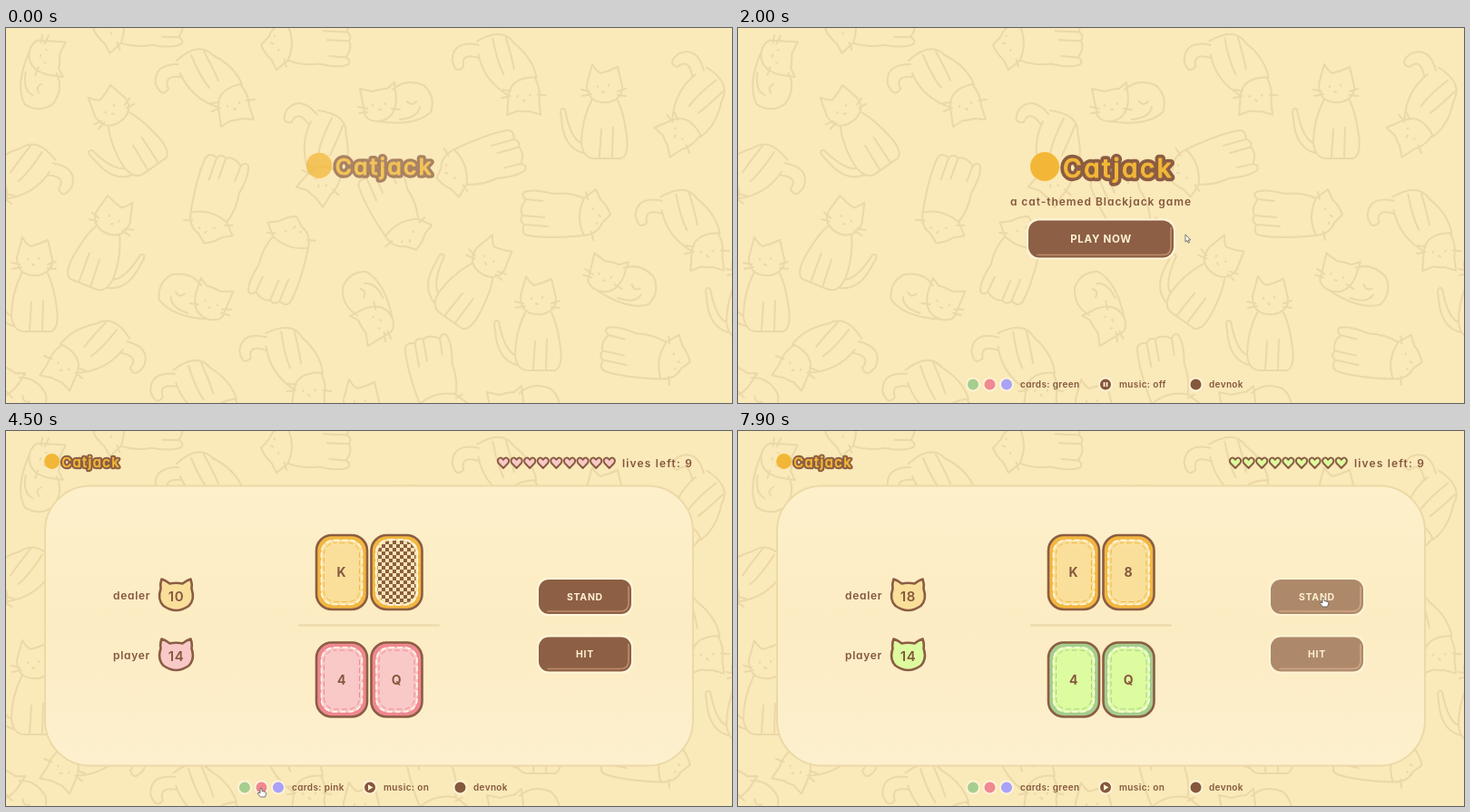
Recreate the animation shown at these times as an HTML page. Size 800x414 px, loop 8 s.

```html
<!DOCTYPE html>
<html lang="en">
<head>
<meta charset="utf-8">
<title>Catjack</title>
<style>
  html, body { margin: 0; width: 100%; height: 100%; overflow: hidden; background: #fae9b9; }
  svg { display: block; width: 100vw; height: 100vh; }
  text { font: 600 12px Inter, Lato, sans-serif; font-feature-settings: "cv11"; letter-spacing: .7px; fill: #85573d; }
  .mid { text-anchor: middle; }
  .small { font-size: 10px; letter-spacing: .35px; }
  .line { fill: none; stroke: #ebd8a6; stroke-width: 2; stroke-linecap: round; stroke-linejoin: round; }
  .edge { stroke: #8b5d43; stroke-width: 2.6; stroke-linejoin: round; }
  .face { fill: var(--face); }
  .ring { fill: var(--ring); }
  .dash { fill: none; stroke: #fffbea; stroke-width: 1.5; stroke-dasharray: 6 3; }
  .stitch { fill: none; stroke: var(--ring); stroke-width: 1; stroke-dasharray: 6 3; stroke-dashoffset: 4; }
  .dealer { --face: #fadf9b; --ring: #f3b740; }
  .word { font-size: 28px; font-weight: 500; letter-spacing: 2.6px; stroke-linejoin: round; }
  .back { stroke: #8b5d43; stroke-width: 8.5px; }
  .front { fill: #f3b737; stroke: #f3b737; stroke-width: 1px; }
  .label { fill: #fff3d6; letter-spacing: .7px; text-anchor: middle; }
</style>
</head>
<body>
<svg id="stage" viewBox="0 0 800 414" preserveAspectRatio="none">
  <defs>
    <g id="sit"><path d="M-8-30L-2-52Q2-45 7-42Q16-44 26-49L31-28Q32-14 16-10Q-8-8-8-30M-2-14Q-14 10-14 35Q-12 52 0 52L30 52Q40 48 35 20Q32 0 26-12M6 50L8 20M20 50L21 18M-12 46Q-34 40-36 8Q-39-6-32-2Q-26 30-14 35M4-28v1M16-29v1M9-22l2 1M-14-24l9 2M-13-17l10-2M26-22l9-3M26-18l9 1"/></g>
    <g id="lie"><path d="M20-19Q4-26-14-24Q-36-30-46-26Q-50-22-44-18Q-52-8-48 0Q-52 6-46 10Q-50 20-42 22Q-20 26 20 22M-44-18L-26-16M-48 0L-24 2M-46 10L-20 12M20-19L33-29L38-18Q46-10 49-1L40 8Q36 20 20 22Q10 2 20-19M30-8v1M34 8v1M36 0l2 1M24-18l-2-8M28 18l2 9"/></g>
    <g id="loaf"><path d="M-4-15Q10-28 30-20Q44-8 38 10Q20 26-20 20M-34 14L-40-16L-26-13Q-16-16-10-16L-2-23L0-6Q0 18-20 20Q-30 20-34 14M4 18Q24 16 26 4M12-2q5 6 10 0M-26 2v1M-12 0v1M-19 7l2 0M-42 4l10 2M-41 11l9-1M-5 6l9 1"/></g>
    <g id="walk"><path d="M-30-28Q-6-50 10-34Q34-22 42-2M-26-14Q-14 14 17 24M-14-34Q-4-10 6 2M0-38Q10-20 16-6M-28-24Q-56-24-53-2Q-46 14-39 3Q-46-12-24-10M40-2Q50 10 50 22L55 37L42 36Q36 38 30 38L19 45L16 24Q14 4 40-2M26 22v1M39 18v1M33 25l2 1M17 18l-9 1M18 24l-9 4M47 16l9-1"/></g>
    <pattern id="check" width="8" height="8" patternUnits="userSpaceOnUse" x="410" y="121">
      <path fill="#fbe5b1" d="M0 0h8v8h-8z"/><path fill="#8b5d43" d="M0 0h4v4h-4zM4 4h4v4h-4z"/>
    </pattern>
    <linearGradient id="cream" x2="0" y2="1">
      <stop stop-color="#fdf0ca"/><stop offset=".5" stop-color="#fcecc3"/><stop offset="1" stop-color="#fdf0ce"/>
    </linearGradient>
  </defs>
</svg>
<script>
const stage = document.getElementById('stage');
const LOOP = 8000;
const GAME_AT = 2250, REVEAL_AT = 7550;
const themes = {
  green: { face: '#ddfb9f', ring: '#a5cd8c', shift: 0 },
  pink: { face: '#f9c9c8', ring: '#ef8890', shift: 4 },
  purple: { face: '#dcd5fc', ring: '#aaa1f7', shift: -2 },
};
const themeTimes = [[0, 'green'], [4350, 'pink'], [5150, 'purple'], [6100, 'green']];

// pose, x, y, rotation, mirrored
const cats = [
  ['loaf', 40, 50, 105], ['lie', 145, -4, 175], ['walk', 218, 64, 0], ['lie', 330, 16, 178],
  ['loaf', 430, 83, 0], ['walk', 543, 48, 12], ['sit', 648, 92, 0], ['walk', 753, 80, 75],
  ['sit', 122, 118, -35], ['walk', 20, 168, 10, 1], ['lie', 230, 190, 105], ['walk', 342, 132, 50],
  ['lie', 428, 202, 62], ['lie', 520, 148, 160], ['lie', 617, 207, 0], ['walk', 745, 220, 12],
  ['sit', 118, 240, 22, 1], ['sit', 20, 283, 0], ['lie', 306, 255, -72], ['loaf', 208, 298, 12, 1],
  ['loaf', 400, 308, -110], ['sit', 508, 272, 35], ['sit', 575, 326, 0], ['loaf', 678, 280, 25],
  ['sit', 808, 290, 0], ['lie', 705, 363, 8], ['walk', 100, 362, 15, 1], ['walk', 212, 408, 5],
  ['walk', 308, 372, 15], ['sit', 380, 440, 0], ['lie', 472, 390, 75], ['loaf', 570, 418, 0],
  ['loaf', 8, 400, 40],
];
const doodles = cats.map(([pose, x, y, turn, flip]) =>
  `<use href="#${pose}" transform="translate(${x} ${y}) rotate(${turn}) scale(${flip ? -1 : 1} 1)"/>`).join('');

const box = (x, y, w, h, r, attrs) => `<rect x="${x}" y="${y}" width="${w}" height="${h}" rx="${r}" ${attrs}/>`;
const text = (x, y, str, attrs = '') => `<text x="${x}" y="${y}" ${attrs}>${str}</text>`;

const logo = `<circle cx="338" cy="153" r="16" fill="#f3b737"/>` +
  ['back', 'front'].map(c => text(358, 164.5, 'Catjack', `class="word ${c}"`)).join('');

const button = (x, y, w, h, str, size) =>
  box(x, y, w, h, h * .29, 'fill="#fff6da"') +
  box(x + 2, y + 2, w - 4, h - 4, h * .27, 'fill="#8d5f44"') +
  `<path d="M${x + w - 5} ${y + 10}V${y + h - 14}q0 9-9 9H${x + 12}" fill="none" stroke="#bd8c6d" stroke-width="1.6" stroke-linecap="round"/>` +
  text(x + w / 2, y + h / 2 + size * .36, str, `class="label" style="font-size:${size}px;font-weight:700"`);

const card = (x, y, str) =>
  box(x, y, 56, 82, 17, 'class="ring edge"') +
  box(x + 5, y + 5, 46, 72, 14, 'class="face"') +
  box(x + 5.5, y + 5.5, 45, 71, 14, 'class="dash"') +
  box(x + 8.5, y + 8.5, 39, 65, 12, 'class="stitch"') +
  text(x + 28, y + 46, str, 'class="mid" style="font-size:14px;font-weight:700"');

const badge = (y, id) =>
  `<path transform="translate(187.5 ${y})" class="face edge" d="M-16-17.5Q-11-16-7-12.5Q0-14 7-12.5Q11-16 16-17.5Q18-12 17-7Q21 5 14 12Q0 22-14 12Q-21 5-17-7Q-18-12-16-17.5Z"/>` +
  text(187.5, y + 7, '', `id="${id}" class="mid" style="font-size:15px"`);

const hearts = Array.from({ length: 9 }, (_, i) =>
  `<path transform="translate(${548 + i * 14.6} 35)" class="face edge" style="stroke-width:2" d="M0 6L-5.3.5Q-7.3-3-4.5-5Q-2-6.4 0-3.2Q2-6.4 4.5-5Q7.3-3 5.3.5Z"/>`).join('');

const dot = (x, fill) => `<circle cx="${x}" cy="393.5" r="7" fill="${fill}" stroke="#fff3d6" stroke-width="2"/>`;

stage.insertAdjacentHTML('beforeend', `
  <g class="line">${doodles}</g>
  <g id="home">
    <g id="title">${logo}</g>
    <g id="sub">${text(400, 195.5, 'a cat-themed Blackjack game', 'class="mid" style="letter-spacing:.95px"')}</g>
    <g id="play">${button(318, 210.5, 164, 45, 'PLAY NOW', 11.5)}</g>
  </g>
  <g id="game">
    ${box(43, 60.5, 714, 309, 50, 'fill="url(#cream)" stroke="#ecd9a6" stroke-width="2"')}
    <g transform="translate(83.5 34) scale(.53) translate(-400 -154)">${logo}</g>
    ${hearts}
    ${text(679, 39.5, 'lives left: 9', 'style="letter-spacing:1.15px"')}
    <path d="M323 214.5H477" class="line" stroke-width="2.5"/>
    ${text(118, 186, 'dealer')}${text(118, 252, 'player')}
    <g class="dealer">${badge(181, 'dealerScore')}</g>
    ${badge(247, 'playerScore')}
    <g id="dealerCards" class="dealer">
      ${card(342, 115, 'K')}
      <g id="second">${card(402.5, 115, '8')}</g>
      <g id="hidden">
        ${box(402.5, 115, 56, 82, 17, 'class="ring edge"')}
        ${box(407, 119.5, 47, 73, 15, 'fill="#fbe5b1"')}
        ${box(409.5, 121, 42, 70, 15, 'fill="url(#check)"')}
        ${box(407.5, 120, 46, 72, 15, 'class="dash"')}
      </g>
    </g>
    <g id="playerCards">${card(342, 233.5, '4')}${card(402.5, 233.5, 'Q')}</g>
    <g id="actions">
      <g id="stand">${button(585, 162, 106, 42, 'STAND', 10.5)}</g>
      <g id="hit">${button(585, 225.5, 106, 42, 'HIT', 10.5)}</g>
    </g>
  </g>
  <g id="cards">
    ${dot(259, '#a6ce8e')}${dot(277.5, '#ef8992')}${dot(296, '#a9a2f8')}
    ${text(311, 397, '', 'id="cardName" class="small"')}
  </g>
  <g id="music">
    ${dot(405, '#85573d')}
    <path id="pause" d="M403.5 391v5M406.5 391v5" stroke="#fff3d6" stroke-width="1.7"/>
    <path id="run" d="M403 390.3L408.5 393.5L403 396.7Z" fill="#fff3d6"/>
    ${text(420, 397, '', 'id="musicName" class="small"')}
  </g>
  <g id="code">${dot(504.5, '#85573d')}${text(519, 397, 'devnok', 'class="small"')}</g>
  <g id="cursor" stroke="#555" stroke-width=".8" stroke-linejoin="round" fill="#fff">
    <path id="arrow" d="M0 0V8.2L1.9 6.5L3.1 9.2L4.4 8.6L3.2 6H5.7Z"/>
    <path id="hand" d="M-1 .8Q0-.4 1 .8V3.5L5 4.6Q6 5 5.6 7L4.5 10H-.6L-4 6Q-3.6 4.6-1 6Z"/>
  </g>`);

const el = {};
stage.querySelectorAll('[id]').forEach(node => el[node.id] = node);

const clamp = v => Math.max(0, Math.min(1, v));
const span = (t, start, length) => clamp((t - start) / length);
const smooth = p => p * p * (3 - 2 * p);
const show = (name, on) => el[name].style.display = on ? '' : 'none';
const write = (name, str) => { if (el[name].textContent !== str) el[name].textContent = str; };

function place(name, opacity, dx = 0, dy = 0, scale = 1, cx = 400, cy = 0) {
  el[name].setAttribute('opacity', opacity);
  el[name].setAttribute('transform', `translate(${cx + dx} ${cy + dy}) scale(${scale}) translate(${-cx} ${-cy})`);
}

// time, x, y
const route = [
  [1450, 696, -14], [1900, 493, 228], [2030, 493, 228], [2200, 448, 236], [2400, 448, 236],
  [2750, 464, 229], [3500, 464, 229], [4150, 281, 394], [4700, 281, 394], [5000, 298, 394],
  [5450, 298, 394], [5750, 276, 393], [5840, 276, 393], [6000, 257, 393], [6250, 257, 393],
  [7000, 645, 184], [8000, 645, 184],
];

function cursorAt(t) {
  const i = route.findIndex(k => k[0] > t);
  if (i < 1) return route[0].slice(1);
  const [a, b] = [route[i - 1], route[i]];
  const p = smooth(span(t, a[0], b[0] - a[0]));
  return [a[1] + (b[1] - a[1]) * p, a[2] + (b[2] - a[2]) * p];
}

function drawHome(t) {
  const enter = smooth(span(t, -200, 500));
  place('title', clamp(.72 + t / 700), 0, -2 * (1 - enter), clamp(.885 + t / 2200), 400, 154);
  const sub = span(t, 250, 550);
  place('sub', clamp(sub * 2), 0, 0, 1 + .15 * (1 - smooth(sub)), 400, 191);
  const pop = span(t, 1100, 230);
  place('play', clamp(pop * 3), 0, 18 * (1 - pop), .3 + .7 * pop, 400, 233);
}

function drawGame(t) {
  el.game.setAttribute('opacity', span(t, GAME_AT, 200));
  el.dealerCards.setAttribute('opacity', span(t, 2500, 200));
  el.playerCards.setAttribute('opacity', span(t, 2790, 200));
  const pop = span(t, 3200, 250);
  place('actions', pop, 0, 0, .7 + .3 * smooth(pop), 638, 215);
  const used = 1 - .3 * span(t, 7200, 150);
  el.stand.setAttribute('opacity', used);
  el.hit.setAttribute('opacity', used);
  const open = t >= REVEAL_AT;
  show('hidden', !open);
  show('second', open);
  write('dealerScore', open ? '18' : '10');
  write('playerScore', '14');
}

function draw(t) {
  const playing = t >= GAME_AT;
  show('home', !playing);
  show('game', playing);
  playing ? drawGame(t) : drawHome(t);

  const name = themeTimes.filter(k => k[0] <= t).pop()[1];
  const theme = themes[name];
  stage.style.setProperty('--face', theme.face);
  stage.style.setProperty('--ring', theme.ring);
  write('cardName', 'cards: ' + name);
  write('musicName', playing ? 'music: on' : 'music: off');
  show('pause', !playing);
  show('run', playing);
  [['cards', 900, 1], ['music', 1000, -1], ['code', 1100, -1]].forEach(([id, start, side]) => {
    const p = span(t, start, 250);
    place(id, p, side * theme.shift, -10 * (1 - p));
  });

  const [x, y] = cursorAt(t);
  const overPlay = !playing && x > 318 && x < 482 && y > 210;
  const pointing = overPlay || y > 384 || (x > 585 && y < 205 && t > 6300);
  show('arrow', !pointing);
  show('hand', pointing);
  el.cursor.setAttribute('transform', `translate(${x} ${y})`);
}

function tick() {
  draw(performance.now() % LOOP);
  requestAnimationFrame(tick);
}
tick();
</script>
</body>
</html>
```
